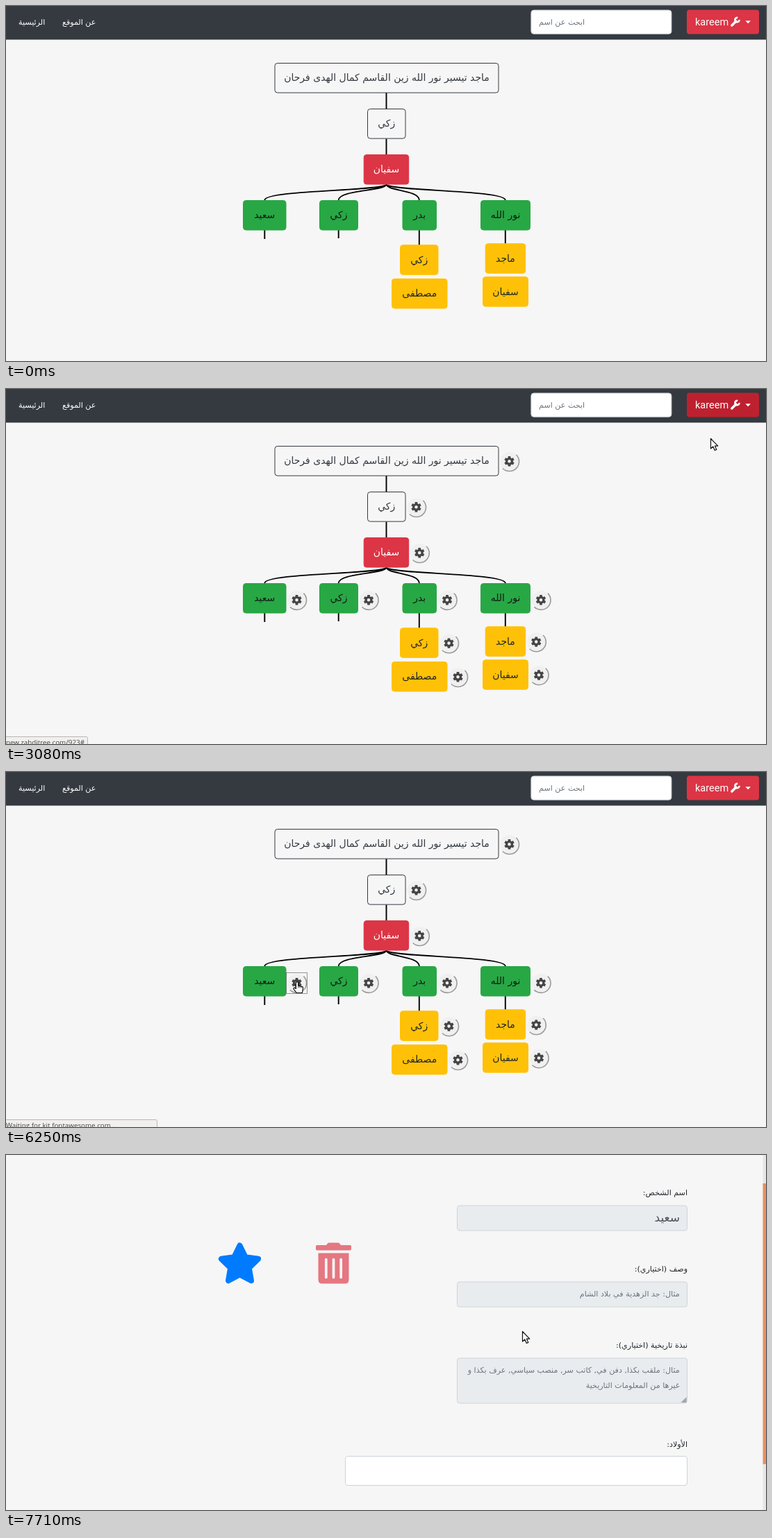
An HTML page that plays this animation: 1094x512 px, repeating every 8000 ms.

```html
<!DOCTYPE html>
<html lang="ar">
<head>
<meta charset="utf-8">
<title>Family tree</title>
<style>
html, body { margin: 0; width: 100%; height: 100%; overflow: hidden; background: #f6f6f6; }
svg { display: block; }
text { font-family: "DejaVu Sans", sans-serif; font-size: 11.1px; white-space: pre; }
.user { font-family: Roboto, sans-serif; font-size: 14.5px; }
.hint { font-family: "Open Sans", "Noto Sans", sans-serif; font-size: 9.8px; }
</style>
</head>
<body>
<svg id="stage" width="1094" height="512" viewBox="0 0 1094 512"></svg>
<script>
const LOOP = 8000;
const ORANGE = '#ea8f63', TRACK = '#e6e6e6';

const rect = (x, y, w, h, fill, more = '') =>
  `<rect x="${x}" y="${y}" width="${w}" height="${h}" fill="${fill}" ${more}/>`;
const text = (x, y, str, fill, more = '') =>
  `<text x="${x}" y="${y}" fill="${fill}" ${more}>${str}</text>`;
const rtl = (x, y, str, fill, more = '') => text(x, y, str, fill, 'direction="rtl" ' + more);
const path = (d, more) => `<path d="${d}" ${more}/>`;
const group = (id, body) => `<g id="${id}">${body}</g>`;

// Family tree: left, top, width, name, style
const H = 43.6;
const styles = {
  plain: ['none', '#343a40', '#343a40'],
  red: ['#dc3545', '#dc3545', '#fff'],
  green: ['#28a745', '#28a745', '#101c14'],
  gold: ['#ffc107', '#ffc107', '#212529']
};
const people = [
  [386.5, 82, 323, 'ماجد تيسير نور الله زين القاسم كمال الهدى فرحان', 'plain'],
  [520, 148, 55.5, 'زكي', 'plain'],
  [514.7, 214, 65.5, 'سفيان', 'red'],
  [341, 280, 62.5, 'سعيد', 'green'],
  [451, 280, 56, 'زكي', 'green'],
  [570.5, 280, 49.5, 'بدر', 'green'],
  [683, 280, 72, 'نور الله', 'green'],
  [567, 344.3, 55.5, 'زكي', 'gold'],
  [555, 393, 80.5, 'مصطفى', 'gold'],
  [689.7, 342.3, 58.5, 'ماجد', 'gold'],
  [686, 390.2, 66, 'سفيان', 'gold']
];

function person([x, y, w, name, kind]) {
  const [fill, edge, ink] = styles[kind];
  return rect(x + .5, y + .5, w - 1, H - 1, fill, `rx="3.8" stroke="${edge}"`) +
    rtl(x + w / 2, y + H / 2 + 4.6, name, ink, 'text-anchor="middle" style="font-size:14px"');
}

function gear([x, y, w, , kind]) {
  let teeth = '';
  for (let i = 0; i < 6; i++) {
    const a = Math.PI / 2 + i * Math.PI / 3, c = Math.cos(a), s = Math.sin(a);
    teeth += `M${c * 4} ${s * 4}L${c * 7.2} ${s * 7.2}`;
  }
  const cy = y + H / 2 + (kind === 'green' ? 2.4 : .5);
  return `<g transform="translate(${x + w + 15} ${cy})">
    <circle cx=".5" cy=".5" r="13.6" fill="#f0f0f0"/>
    <path d="M9.9 -9.6A13.7 13.7 0 1 1 -9.6 10.2" fill="none" stroke="#9d9a97" stroke-width="1.6"/>
    <circle r="3.9" fill="none" stroke="#444" stroke-width="3.2"/>
    <path d="${teeth}" stroke="#444" stroke-width="3.7"/></g>`;
}

function links() {
  let d = 'M547.5 125V148M547.5 191.5V214';
  for (const [x, end] of [[372.3, 336], [478.7, 335], [594.8, 345], [718.8, 343]])
    d += `M${x} 280C${x} 265 547.5 267 547.5 257M${x} 323V${end}`;
  return path(d, 'fill="none" stroke="#000" stroke-width="1.9"');
}

// Top bar
const wrench = path('M2.2 12.2L8.2 6.2', 'stroke="#fff" stroke-width="3.5" stroke-linecap="round"') +
  path('M10.6 1.3A3.1 3.1 0 1 0 13 4.1', 'fill="none" stroke="#fff" stroke-width="2.7"');
const bar = rect(0, 0, 1094, 48.5, '#343a40') +
  text(18, 27, 'الرئيسية', '#fff') + text(81, 27, 'عن الموقع', '#fff') +
  group('tools',
    group('search', rect(755.9, 6, 202, 34.2, '#fff', 'rx="3.8" stroke="#ced4da"') +
      text(767, 27, 'ابحث عن اسم', '#6c757d')) +
    rect(978.6, 4.1, 106.8, 37.8, 'none', 'id="ring" rx="5.2" stroke="#e15361" stroke-opacity=".5" stroke-width="2.9"') +
    rect(980, 5.5, 104, 35, '#dc3545', 'id="button" rx="3.8"') +
    text(992, 28, 'kareem', '#fff', 'id="user" class="user"') +
    `<g id="wrench" transform="translate(1042.6 15.7)">${wrench}</g>` +
    path('M1064.3 21.2H1072L1068.15 25.2Z', 'fill="#fff"'));

const menu = rect(980.9, 43, 140, 134.7, '#fff', 'rx="3.8" stroke="#000" stroke-opacity=".18"') +
  rect(981.4, 44, 113, 43, '#f3f4f5', 'id="hover"') +
  path('M981 87.5H1094M981 132.5H1094', 'stroke="#e9ecef"') +
  rtl(1087, 69, 'إظهار الأدوات', '#212529') +
  rtl(1070, 114, 'حسابي', '#212529') + rtl(1070, 159.5, 'خروج', '#212529') +
  rect(0, 507, 1094, 5, TRACK) + rect(0, 507, 1064, 5, ORANGE);

// Person form
const label = (y, str) => rtl(981, y, str, '#212529');
const field = (x, y, w, h, fill) => rect(x, y, w, h, fill, 'rx="3.5" stroke="#ced4da"');
const note = (y, str) => rtl(969.7, y, str, '#6c757d');

function star(cx, cy, outer, inner) {
  const points = Array.from({ length: 10 }, (_, i) => {
    const a = i * Math.PI / 5, r = i % 2 ? inner : outer;
    return (cx + r * Math.sin(a)).toFixed(1) + ',' + (cy - r * Math.cos(a)).toFixed(1);
  });
  return `<polygon points="${points.join(' ')}" fill="#007bff" stroke="#007bff" stroke-width="8" stroke-linejoin="round"/>`;
}

const PINK = '#e57781';
const trash = rect(446, 180.5, 51, 7.5, PINK, 'rx="1.8"') +
  path('M460 182L462.5 178.5Q463.3 177 465 177H478Q479.7 177 480.5 178.5L483 182Z', `fill="${PINK}"`) +
  path('M449.5 192H493.5V230.5Q493.5 236 488 236H455Q449.5 236 449.5 230.5Z', `fill="${PINK}"`) +
  path('M460.8 201V227M471.5 201V227M482.2 201V227', 'stroke="#f6f6f6" stroke-width="3.7" stroke-linecap="round"');

const form = label(108, 'اسم الشخص:') + field(649.5, 123.5, 331, 36, '#e9ecef') +
  rtl(970, 146.5, 'سعيد', '#495057', 'style="font-size:17px"') +
  label(218, 'وصف (اختياري):') + field(649.5, 233.5, 331, 36, '#e9ecef') +
  note(254.5, 'مثال: جد الزهدية في بلاد الشام') +
  label(328, 'نبذة تاريخية (اختياري):') + field(649.5, 343.5, 331, 65, '#e9ecef') +
  note(364, 'مثال: ملقب بكذا, دفن في, كاتب سر, منصب سياسي, عرف بكذا و') +
  note(386, 'غيرها من المعلومات التاريخية') +
  path('M971.5 407.5L979.5 399.5V407.5Z', 'fill="#a3a6a9"') +
  label(471, 'الأولاد:') + field(488.5, 485, 492, 42, '#fff') +
  group('icons', star(336.5, 209, 28, 14) + trash);

const arrow = path('M.5 .5V15L3.8 12L6.3 17.5L8.8 16.4L6.4 11.1H10.8Z',
  'fill="#fff" stroke="#111" stroke-width="1.2" stroke-linejoin="round"');
const hand = path('M-1.6 1.2Q0 -.8 1.6 1.2V5.6L7 6.8Q8.8 7.2 8.5 9L7.4 16H-.8L-5 10.4Q-5.2 8.2 -3.2 8.7L-1.6 10Z',
  'fill="#fff" stroke="#111" stroke-width="1.2" stroke-linejoin="round"') +
  path('M1.6 6V9M3.9 6.5V9M6.2 7V9', 'stroke="#111" stroke-width=".8"');

document.getElementById('stage').innerHTML = rect(0, 0, 1094, 512, '#f6f6f6') +
  group('page',
    group('tree', links() + people.map(person).join('') + group('gears', people.map(gear).join('')) +
      rect(403.5, 289.5, 30, 30, 'none', 'id="focus" stroke="#333" stroke-dasharray="1 1"')) +
    group('form', form) + bar) +
  group('menu', menu) +
  group('scroll', rect(1089.5, 0, 4.5, 512, TRACK) + rect(1089.5, 0, 4.5, 405, ORANGE, 'id="thumb"')) +
  group('status', rect(-4, 501.5, 10, 16, '#f1f0ee', 'id="bubble" rx="2" stroke="#b9b7b4"') +
    text(0, 512.5, '', '#444', 'id="hint" class="hint"')) +
  group('arrow', arrow) + group('hand', hand);

const el = {};
document.querySelectorAll('[id]').forEach(node => el[node.id] = node);
const show = (name, on) => el[name].setAttribute('display', on ? 'inline' : 'none');
const shift = (name, x, y) => el[name].setAttribute('transform', `translate(${x} ${y})`);

// Pointer moves: start, end, steps, x, y
const moves = [
  [580, 1040, 12, 1002.5, 20],
  [2130, 2890, 5, 1014, 71],
  [3290, 3460, 2, 1001, 66],
  [3830, 4580, 5, 409, 381],
  [4790, 4790, 1, 411, 371],
  [5000, 5420, 3, 419, 300],
  [6000, 6000, 1, 419, 302.5],
  [6460, 6460, 1, 418, 304],
  [6830, 7170, 3, 743, 254]
];

function pointer(t) {
  let x = 973, y = -16;
  for (const [start, end, steps, toX, toY] of moves) {
    if (t < start) break;
    const gap = (end - start) / (steps - 1 || 1) || 1;
    const k = Math.min(steps, Math.floor((t - start) / gap + 1e-6) + 1) / steps;
    const p = k * k * (3 - 2 * k);
    x += (toX - x) * p;
    y += (toY - y) * p;
  }
  return [x, y];
}

function darkness(t) {
  if (t < 3290) return Math.max(0, Math.min(1, (t - 800) / 150));
  return t < 3460 ? .4 : 0;
}

function hint(t) {
  if (t >= 2320 && t < 3290) return ['new.zahditree.com/923#', 118];
  if (t >= 6000 && t < 6250) return ['Waiting for new.zahditree.com…', 218];
  if (t >= 6250 && t < 6460) return ['Waiting for kit.fontawesome.com…', 218];
  return ['', 0];
}

function draw(t) {
  const onForm = t >= 6460, loaded = !onForm || t >= 6830;
  const open = t >= 1750 && t < 3080;
  const scroll = t >= 7710 ? 50.5 : t >= 7540 ? 25 : 0;

  show('tree', !onForm);
  show('form', onForm);
  show('scroll', onForm);
  show('gears', t >= 3080);
  show('focus', t >= 6000);
  show('icons', loaded);
  show('wrench', loaded);
  show('menu', open);
  show('hover', t >= 2510);
  show('ring', t >= 1750 && t < 2890);

  shift('page', 0, -scroll);
  shift('tools', onForm ? -9 : 0, 0);
  const slack = loaded ? 0 : 14.6;
  shift('search', slack, 0);
  shift('user', slack, 0);
  el.button.setAttribute('x', 980 + slack);
  el.button.setAttribute('width', 104 - slack);
  el.thumb.setAttribute('y', scroll * .81);

  const d = darkness(t), mix = (a, b) => Math.round(a + (b - a) * d);
  el.button.setAttribute('fill', `rgb(${mix(220, 189)},${mix(53, 33)},${mix(69, 48)})`);

  const [message, width] = hint(t);
  show('status', message);
  el.hint.textContent = message;
  el.bubble.setAttribute('width', width + 3.5);

  const [x, y] = pointer(t);
  const pointing = t < 3080 ? y > 5 && x > 980 : t >= 5420 && t < 6460;
  show('hand', t >= 580 && pointing);
  show('arrow', t >= 580 && !pointing);
  shift('hand', x, y);
  shift('arrow', x, y);
}

const begin = performance.now();
function tick() {
  draw((performance.now() - begin) % LOOP);
  requestAnimationFrame(tick);
}
tick();
</script>
</body>
</html>
```
